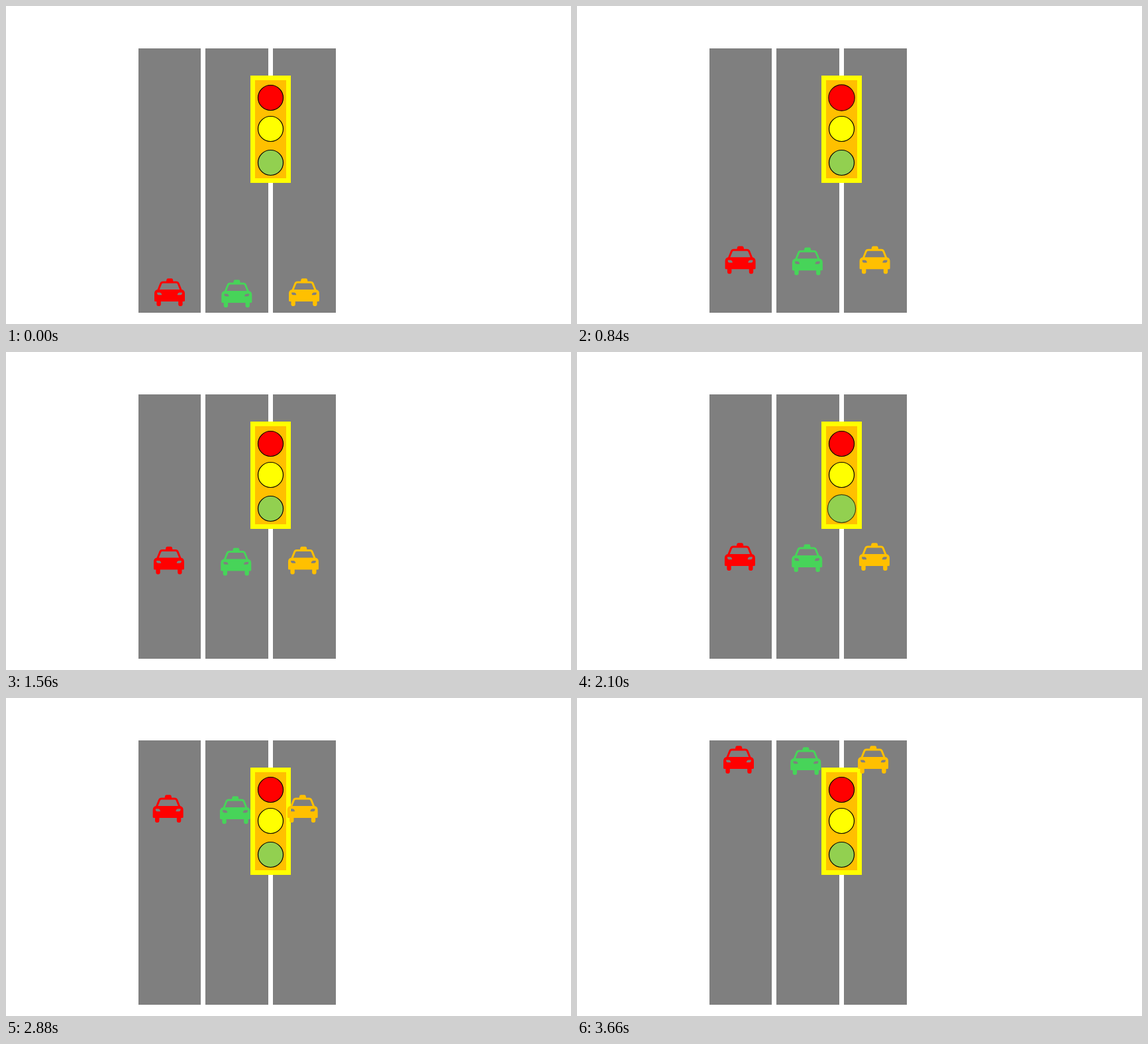
Animation, 853 px wide and 480 px high, one loop 3720 ms. Source, as an HTML page:

```html
<!DOCTYPE html>
<html lang="en">
<head>
<meta charset="utf-8">
<title>Traffic light and taxis</title>
<style>
html, body { margin: 0; width: 100%; height: 100%; overflow: hidden; background: #fff; }
svg { display: block; }
</style>
</head>
<body>
<svg width="853" height="480" viewBox="0 0 853 480">
  <defs>
    <path id="car" fill-rule="evenodd" d="
      M18 4.6 L18.4 2 Q18.8 .3 20.5 .3 H26 Q27.6 .3 28 2 L28.4 4.6
      H33 Q36.4 4.6 37.6 7.6 L41.4 17 Q46 18.2 46 23 V33.5 Q46 35 44.5 35
      H42.6 V39.2 Q42.6 42 39.4 42 Q36.2 42 36.2 39.2 V35
      H9.8 V39.2 Q9.8 42 6.6 42 Q3.4 42 3.4 39.2 V35
      H1.5 Q0 35 0 33.5 V23 Q0 18.2 4.6 17 L8.4 7.6 Q9.6 4.6 13 4.6 Z
      M13.2 7.6 Q11.6 7.6 11 9 L7.8 17 H38.2 L35 9 Q34.4 7.6 32.8 7.6 Z
      M4.2 21.4 H8.4 Q11 21.8 11.2 25.2 H6.4 Q4.2 25 4.2 23 Z
      M41.8 21.4 H37.6 Q35 21.8 34.8 25.2 H39.6 Q41.8 25 41.8 23 Z"/>
  </defs>
  <g fill="#7f7f7f">
    <rect x="200" y="64" width="94" height="399"/>
    <rect x="301" y="64" width="95" height="399"/>
    <rect x="403" y="64" width="95" height="399"/>
  </g>
  <rect x="369" y="105" width="61" height="162" fill="#ff0"/>
  <rect x="376" y="112" width="47" height="148" fill="#ffc000"/>
  <g stroke="#000" stroke-width="1.2">
    <circle id="red" cx="399.5" cy="138.5" r="19" fill="#f00"/>
    <circle cx="399.5" cy="185.5" r="19" fill="#ff0"/>
    <circle id="green" cx="399.5" cy="236.5" r="19" fill="#92d050"/>
  </g>
  <g id="cars">
    <use href="#car" fill="#f00"/>
    <use href="#car" x="101.3" y="2" fill="#47d459"/>
    <use href="#car" x="203" fill="#ffc000"/>
  </g>
</svg>
<script>
const LOOP = 3720, STEP = 60, HALF = 450;
const START_Y = 411, FIRST_RUN = 120, SECOND_RUN = 219;
const el = id => document.getElementById(id);
const cars = el('cars'), red = el('red'), green = el('green');
const clamp = u => Math.min(1, Math.max(0, u));

// Speeds up over share a, cruises, then slows down over share a.
function glide(u, a) {
  u = clamp(u);
  const v = 1 / (1 - a);
  if (u < a) return v * u * u / (2 * a);
  if (u > 1 - a) return 1 - v * (1 - u) ** 2 / (2 * a);
  return v * (u - a / 2);
}

function pulse(lamp, t, start) {
  const k = clamp(1 - Math.abs(t - start - HALF) / HALF);
  lamp.setAttribute('r', 19 * (1 + 0.2 * k));
  lamp.setAttribute('stroke-opacity', 1 - 0.35 * Math.min(1, k * 2.5));
}

function draw(t) {
  const run = FIRST_RUN * glide((t - 122) / 1600, 0.45)
            + SECOND_RUN * glide((t - 1977) / 1510, 0.396);
  const x = 224 - 3 * run / (FIRST_RUN + SECOND_RUN);
  cars.setAttribute('transform', `translate(${x} ${START_Y - run})`);
  pulse(red, t, 20);
  pulse(green, t, 1847);
}

const begin = performance.now();
function tick(now) {
  const t = Math.max(0, now - begin) % LOOP;
  draw(Math.floor(t / STEP) * STEP);
  requestAnimationFrame(tick);
}
draw(0);
requestAnimationFrame(tick);
</script>
</body>
</html>
```
